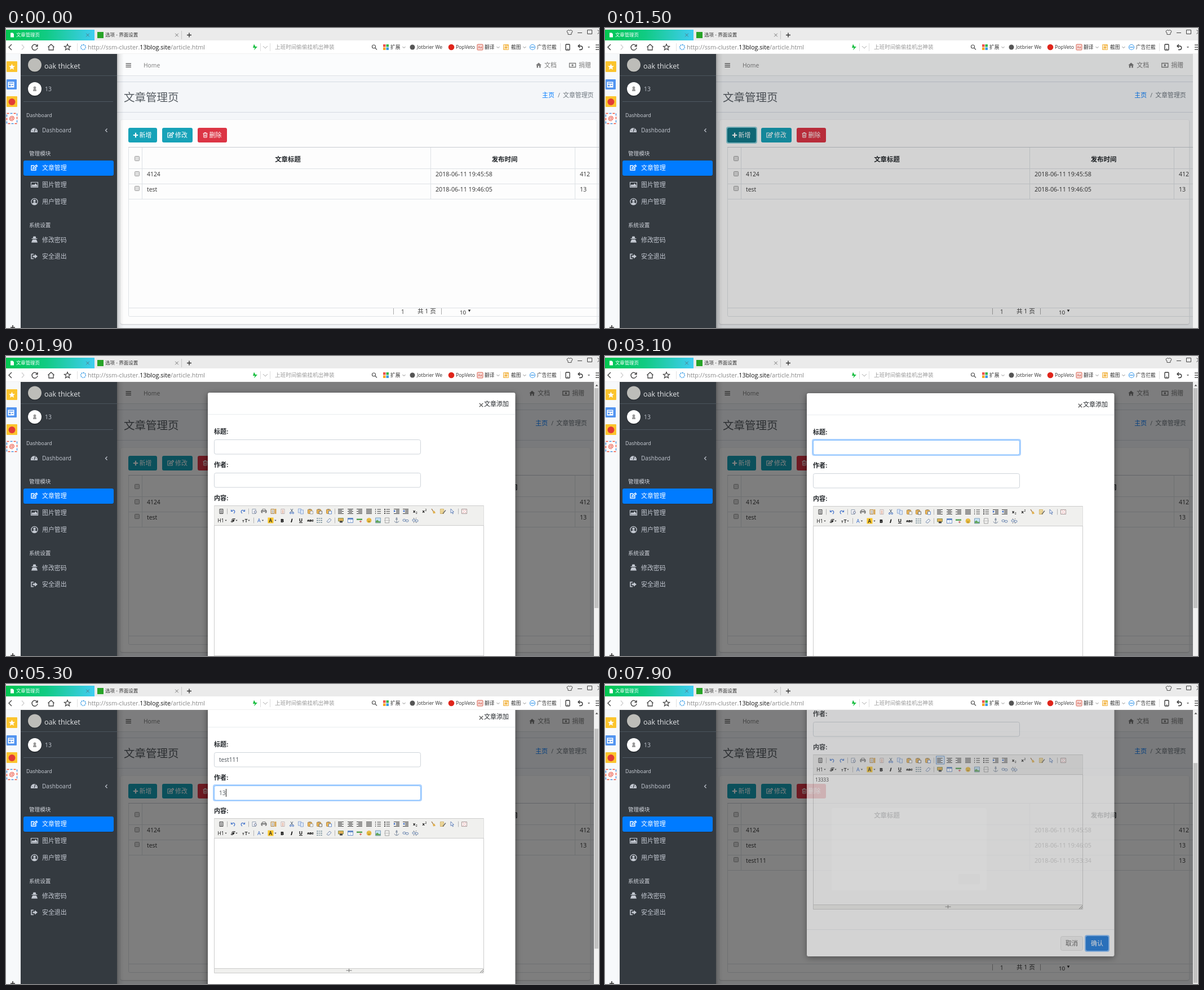
Write an HTML page with a canvas that moves like this. It is 1052 px wide and 532 px high and loops after 8 s.

```html
<!DOCTYPE html>
<html lang="zh">
<head>
<meta charset="utf-8">
<style>
html, body { margin: 0; width: 100%; height: 100%; overflow: hidden; background: #fff; }
canvas { display: block; }
</style>
</head>
<body>
<canvas id="stage" width="1052" height="532"></canvas>
<script>
const W = 1052, H = 532, LOOP = 8000, STEP = 100;
const FONT = '"Open Sans", "Noto Sans CJK SC", "Noto Sans CJK", sans-serif';
const stage = document.getElementById('stage').getContext('2d');
const layer = Object.assign(document.createElement('canvas'), { width: W, height: H }).getContext('2d');
let g = stage;

const clamp = v => Math.max(0, Math.min(1, v));

// cubic-bezier(0, 0, .58, 1)
function easeOut(x) {
  x = clamp(x);
  let lo = 0, hi = 1;
  for (let i = 0; i < 20; i++) {
    const s = (lo + hi) / 2;
    if (1.74 * (1 - s) * s * s + s ** 3 < x) lo = s; else hi = s;
  }
  return 3 * (1 - lo) * lo * lo + lo ** 3;
}

// ---- drawing helpers ----
function rect(x, y, w, h, fill) { g.fillStyle = fill; g.fillRect(x, y, w, h); }

function box(x, y, w, h, r, fill, stroke, lw = 1) {
  g.beginPath();
  g.roundRect(x, y, w, h, r);
  if (fill) { g.fillStyle = fill; g.fill(); }
  if (stroke) { g.strokeStyle = stroke; g.lineWidth = lw; g.stroke(); }
}

function disc(x, y, r, fill, stroke, lw = 1) { box(x - r, y - r, 2 * r, 2 * r, r, fill, stroke, lw); }

function setFont(size, weight = 400) { g.font = `${weight} ${size}px ${FONT}`; }

// y is the middle of the line; returns the text width
function text(s, x, y, size, color, weight, align = 'left') {
  setFont(size, weight);
  g.textAlign = align;
  g.fillStyle = color;
  g.fillText(s, x, y + size * 0.36);
  return g.measureText(s).width;
}

// path drawn around (x, y)
function icon(x, y, d, color, lw = 1.2, fill) {
  const p = new Path2D(d);
  g.save();
  g.translate(x, y);
  if (fill) { g.fillStyle = fill; g.fill(p); }
  if (lw) { g.strokeStyle = color; g.lineWidth = lw; g.stroke(p); }
  g.restore();
}
const solid = (x, y, d, color) => icon(x, y, d, color, 0, color);
const chevron = (x, y, color = '#888') => icon(x, y, 'M-2.5-1L0 1.5L2.5-1', color, 1);
const cross = (x, y, r, color, lw = 1) => icon(x, y, `M${-r} ${-r}L${r} ${r}M${r} ${-r}L${-r} ${r}`, color, lw);
const plus = (x, y, r, color, lw) => icon(x, y, `M${-r} 0H${r}M0 ${-r}V${r}`, color, lw);
const HOUSE = 'M-5 0L0-4.5L5 0H3.5V4.5H1V1H-1V4.5H-3.5V0Z';
const STAR = 'M0-5.5L1.6-1.8L5.5-1.6L2.5 1L3.5 5L0 2.8L-3.5 5L-2.5 1L-5.5-1.6L-1.6-1.8Z';
const PENCIL = 'M3 0V4H-5V-4H0M-2 1.5L-1.5-.8L4-5L5.5-3.2L0 1.2Z';

// ---- browser frame ----
function drawChrome() {
  rect(0, 0, W, 22, '#ebebeb');
  const tab = g.createLinearGradient(0, 0, 157, 0);
  tab.addColorStop(0, '#02c751');
  tab.addColorStop(0.45, '#10cb83');
  tab.addColorStop(1, '#40cdf2');
  rect(0, 3, 157, 19, tab);
  solid(11, 12.5, 'M-3-4H1L3-2V4H-3Z', '#fff');
  text('文章管理页', 18, 12, 8.4, '#fff');
  cross(145, 12.5, 2.8, '#507a88');
  rect(162, 7, 11, 11, '#28a428');
  text('选项 - 界面设置', 176, 12, 8.5, '#333');
  cross(303, 12.5, 2.8, '#777');
  rect(311, 5, 1, 15, '#c8c8c8');
  plus(325, 12.5, 4, '#333', 1.4);
  icon(1000, 7.5, 'M-2-4L-5-2L-4 1H-3V4H3V1H4L5-2L2-4Q0-2-2-4Z', '#555', 1);
  rect(1014, 8, 8, 1, '#444');
  box(1031.5, 3.5, 8, 7, 0, null, '#444');
  cross(1053, 7, 3.5, '#444');

  rect(0, 22, W, 24, '#fff');
  rect(0, 45, W, 1, '#f0f0f0');
  icon(7, 34, 'M3-5L-2 0L3 5', '#444', 1.4);
  icon(30, 34, 'M-2-4.5L2 0L-2 4.5', '#ccc', 1.2);
  icon(51, 34, 'M4.5-2A5 5 0 1 0 5 1M5-5V-1.5H1.5', '#444', 1.4);
  icon(80, 34, 'M-5.5 0L0-5L5.5 0M-4-1V5H4V-1', '#444', 1.3);
  icon(109, 34, STAR, '#444', 1.2);
  rect(126, 27, 1, 14, '#e0e0e0');
  g.setLineDash([2, 1.2]);
  disc(137, 34, 4.3, null, '#4aa5e8', 1.8);
  g.setLineDash([]);
  let x = 145;
  for (const [s, c] of [['http://ssm-cluster.', '#888'], ['13blog.site', '#111'], ['/article.html', '#888']])
    x += text(s, x, 34, 10.8, c);
  solid(442, 34, 'M-2-5.5L-4 1H-.5L-2 5.5L4-1H.5Z', '#1ec045');
  rect(451, 27, 1, 14, '#ddd');
  icon(460, 34, 'M-4-2L0 2L4-2', '#aaa', 1);
  rect(468, 27, 1, 14, '#ddd');
  text('上班时间偷偷挂机出神装', 477, 34, 9.6, '#999');
  disc(652.5, 33, 3, null, '#555', 1.2);
  icon(656, 36.5, 'M-1-1L2 2', '#555', 1.3);

  ['#f0524c', '#39b54a', '#f6a623', '#3a9be8'].forEach((c, i) =>
    rect(669 + i % 2 * 5.5, 29 + (i >> 1) * 5.5, 4.5, 4.5, c));
  const label = (s, lx) => text(s, lx, 34, 8.7, '#333');
  label('扩展', 682); chevron(706, 34);
  disc(721, 34, 4.5, '#555'); label('Jotbrier We', 729);
  disc(790, 34, 5.3, '#e0251b'); label('PopVeto', 798);
  box(836, 29, 10, 10, 1, '#f8dcd8', '#d8604f');
  text('Aa', 841, 34, 6, '#c43b2e', 400, 'center');
  label('翻译', 849); chevron(873, 34);
  box(882, 29, 10, 10, 1, '#f3b94e');
  icon(887, 34, 'M-3-4V3H4M-4-2H3V4', '#fff', 1.1);
  label('截图', 896); chevron(920, 34);
  disc(934, 34, 4.5, '#fff', '#3e9cec', 1.2);
  rect(931, 33.3, 6, 1.4, '#3e9cec');
  label('广告拦截', 942);
  rect(983, 27, 1, 14, '#ddd');
  box(993, 29, 7, 10, 1, null, '#333', 1.3);
  rect(995.5, 36.5, 2, 1, '#333');
  icon(1019, 34, 'M-1-5L-4-2L-1 1M-4-2H1A3.3 3.3 0 0 1 1 4.5H-2', '#333', 1.3);
  solid(1034, 34, 'M-2-1H2L0 1.5Z', '#666');
  for (const y of [30, 34, 38]) rect(1046, y - .5, 6, 1.2, '#333');

  // shortcut strip
  rect(0, 46, 26, H - 46, '#f7f9fb');
  box(1, 59, 19, 19, 1, '#fbc42d');
  solid(10.5, 69, STAR, '#fff');
  box(1, 91, 18, 18, 1, '#5294f0');
  box(3.5, 95.5, 11, 10, 0, '#fff');
  rect(5, 97, 8, 1.5, '#5294f0');
  rect(5, 100.5, 3.5, 3, '#5294f0');
  rect(10, 101, 3, 1.5, '#5294f0');
  box(1, 121, 19, 19, 1, '#fbc42d');
  disc(10.5, 131, 6, '#e23b36');
  g.setLineDash([4, 8]);
  box(1.5, 151.5, 18, 18, 0, '#fff', '#ef4c36', 1.4);
  g.lineDashOffset = 6;
  box(1.5, 151.5, 18, 18, 0, null, '#4a90d9', 1.4);
  g.setLineDash([]);
  g.lineDashOffset = 0;
  text('@', 10.5, 160.5, 11, '#e8402c', 600, 'center');
  plus(12, 531, 4, '#333', 1.6);
}

// ---- page ----
function drawSidebar() {
  const shade = g.createLinearGradient(197, 0, 209, 0);
  shade.addColorStop(0, 'rgba(0,0,0,.23)');
  shade.addColorStop(0.35, 'rgba(0,0,0,.08)');
  shade.addColorStop(1, 'rgba(0,0,0,0)');
  rect(197, 46, 12, H - 46, shade);
  rect(26, 46, 171, H - 46, '#343a40');
  rect(26, 84, 171, 1, '#4b545c');
  const soft = '#c2c7d0';
  disc(51, 66.5, 12.5, '#272c31');
  disc(51, 65.5, 12, '#bdbdb9');
  text('oak thicket', 68, 67, 12.6, '#e2e4e6');
  disc(51, 109.5, 12.5, '#272c31');
  disc(51, 108, 12, '#fff');
  solid(51, 108, 'M-3 4Q-3 0-1 0A2.4 2.4 0 1 1 1 0Q3 0 3 4Z', '#999');
  text('13', 69, 108, 10.4, soft);
  rect(31, 130, 159, 1, '#4f5962');
  text('Dashboard', 36, 155, 8.9, '#d0d4db');
  solid(50, 181, 'M-6 4A6.2 6.2 0 1 1 6 4Z', soft);
  icon(50, 181, 'M0 3L2-3M-4 1H-3M3 1H4', '#343a40', 1.2);
  text('Dashboard', 64, 181, 10.1, soft);
  icon(178, 181.5, 'M1.5-3L-1.5 0L1.5 3', soft, 1.2);
  text('管理模块', 41, 222.5, 9.6, '#d0d4db');
  box(31, 236, 160, 27, 3, '#2b3035');
  box(31, 235, 160, 27, 3, '#007bff');
  icon(50, 248, PENCIL, '#fff', 1.4);
  text('文章管理', 64, 248.5, 10.9, '#fff');
  box(44.5, 273.5, 12, 9, 0, null, soft, 1.2);
  solid(50.5, 278, 'M-5 3.5V1L-2.5-1L-1 .5L2-2.5L5 1V3.5Z', soft);
  text('图片管理', 64, 278.5, 10.9, soft);
  disc(50.5, 308, 5.6, null, soft, 1.3);
  disc(50.5, 306.5, 2.2, soft);
  solid(50.5, 308, 'M-4 4Q-3 1 0 1T4 4Q0 7-4 4Z', soft);
  text('用户管理', 64, 308, 10.9, soft);
  text('系统设置', 41, 349.5, 9.6, '#d0d4db');
  solid(50.5, 375, 'M-2-5.5H2L3-2H5V-1H-5V-2H-3ZM-3 0H3Q5 2 5.5 5.5H-5.5Q-5 2-3 0Z', soft);
  text('修改密码', 64, 376, 10.9, soft);
  icon(50, 405, 'M-1-4H-5V4H-1', soft, 1.6);
  solid(50, 405, 'M-2.5-1.5H1V-4L6 0L1 4V1.5H-2.5Z', soft);
  text('安全退出', 64, 405, 10.9, soft);
}

function button(x, w, label, tx, color) {
  box(x, 177, w, 26, 3, color);
  text(label, tx, 190, 10.9, '#fff');
}

function drawPage(t) {
  const open = t >= 1400, dx = open ? -11.7 : 0, right = open ? 1043 : W;
  const line = '#dee2e6', grey = '#7c7c7c';
  g.save();
  g.beginPath();
  g.rect(197, 46, right - 197, H - 46);
  g.clip();
  rect(197, 46, W, H, '#f4f6f9');
  rect(197, 46, W, 38, '#fbfcfd');
  rect(197, 84, W, 1, line);
  for (const y of [62.5, 65.5, 68.5]) rect(212.5, y, 9.5, 1.3, '#555');
  text('Home', 244, 66, 10.3, grey);
  solid(945 + dx, 66, HOUSE, grey);
  text('文档', 955 + dx, 66, 10.9, grey);
  box(999.5 + dx, 62.5, 11, 7, 0, null, grey, 1.3);
  disc(1005 + dx, 66, 1.8, grey);
  text('捐赠', 1016 + dx, 66, 10.9, grey);
  rect(197, 95, W, 1, '#d5dae2');
  rect(197, 149, W, 1, '#d5dae2');
  text('文章管理页', 209, 122.5, 19.5, '#565c62', 300);
  text('主页', 951 + dx, 119.5, 10.9, '#007bff');
  text('/', 979 + dx, 119.5, 10.5, '#6c757d');
  text('文章管理页', 988 + dx, 119.5, 10.9, '#6c757d');

  g.shadowColor = 'rgba(0,0,0,.22)';
  g.shadowBlur = 2;
  g.shadowOffsetY = .8;
  box(203, 163, 845 + dx, 362, 3, '#fdfdfd');
  g.shadowColor = 'transparent';

  const focused = t >= 1400 && t < 1900;
  if (focused) box(215, 175, 55, 30, 4, '#8ccfda');
  button(217, 51, '新增', 236.5, focused ? '#117a8b' : t >= 1000 && t < 1400 ? '#138496' : '#17a2b8');
  plus(230, 190, 4.2, '#fff', 2.2);
  button(277, 54, '修改', 300, '#17a2b8');
  icon(292, 190, PENCIL, '#fff', 1.2);
  button(340, 52, '删除', 360.5, '#dc3545');
  icon(353.5, 190, 'M-4-3H4M-1.5-3V-4.5H1.5V-3M-3-3L-2.7 4H2.7L3-3M-1-1V2.5M1-1V2.5', '#fff', 1);

  const rows = [['4124', '2018-06-11 19:45:58', '412'], ['test', '2018-06-11 19:46:05', '13']];
  if (t >= 7800) rows.push(['test111', '2018-06-11 19:53:34', '13']);
  const bottom = 250 + rows.length * 26.7;
  box(217.5, 211.5, 900, 300, 2, null, line);
  rect(217, 211, 900, 1, '#c8ccd1');
  rect(217, 249, 900, 1, line);
  rect(217, 496, 900, 1, line);
  for (const x of [241, 753, 1009]) rect(x, 212, 1, bottom - 212, line);
  const check = y => box(228.5, y - 4, 8, 8, 1, '#dedede', '#a0a0a0');
  check(231.5);
  text('文章标题', 500, 232.5, 11.4, '#212529', 700, 'center');
  text('发布时间', 884.5, 232.5, 11.4, '#212529', 700, 'center');
  rows.forEach(([title, date, author], i) => {
    const y = 259.5 + i * 26.8;
    rect(217, Math.round(y + 16.5), 900, 1, line);
    check(Math.round(y) - 1.5);
    text(title, 250, y, 10.4, '#333');
    text(date, 762, y, 10.7, '#333');
    text(author, 1018, y, 10.6, '#333');
  });
  rect(687, 497, 1, 11, '#aaa');
  text('1', 701, 503, 10, '#333');
  text('共 1 页', 730, 502, 10.6, '#333');
  rect(772, 497, 1, 11, '#aaa');
  text('10', 805, 504, 9.8, '#222');
  solid(822, 501.5, 'M-2.3-2H2.3L0 2Z', '#222');
  g.restore();
}

function drawScrollbar(t, scroll) {
  rect(1043, 46, 9, H - 46, '#f1f1f1');
  if (t < 1600) return;
  solid(1048, 52, 'M-2.5 1.5L0-1.5L2.5 1.5Z', '#505050');
  rect(1044, 57 + scroll * .8, 7, 390, '#c1c1c1');
}

// ---- editor toolbar ----
function bars(x, y, starts, ends, color = '#444') {
  starts.forEach((s, i) => rect(x - 5 + s, Math.round(y - 4.5 + i * 2), ends[i] - s, 1, color));
}

function page(x, y, edge, fill, mark, w = 6, h = 8) {
  box(x - w / 2, y - h / 2, w, h, 0, fill, edge, .9);
  for (let i = 0; i < 3; i++) rect(x - w / 2 + 1.5, y - 2 + i * 2, w - 3, .8, mark);
}

function clipboard(x, y, mark) {
  box(x - 4.5, y - 3.5, 7, 7.5, 1, '#eab65a', '#a5782f', .8);
  rect(x - 2.5, y - 4.5, 3, 1.5, '#888');
  box(x - .5, y - .5, 5, 5, 0, '#fff', mark, .8);
}

function drawToolbar(y, active) {
  const sep = (x, sy) => rect(x, sy - 5, 1, 10, '#b5b5b5');
  const arrow = (x, sy) => solid(x, sy, 'M-1.7-.8H1.7L0 1.2Z', '#333');
  rect(369.5, y, 478, 34.5, '#f0f0ee');
  rect(369.5, y + 34, 478, 1, '#ccc');
  const a = y + 9.5, b = y + 25.5;
  [392, 430, 583, 802].forEach(x => sep(x, a));
  [439, 583].forEach(x => sep(x, b));

  page(382, a, '#333', '#ddd', '#444');
  const UNDO = 'M-3.5-3V0H-.5M-3-.5Q0-3.5 2.5-1Q3.5 2 1 3.5';
  icon(403, a, UNDO, '#4a78cc', 1.2);
  g.save(); g.translate(420, a); g.scale(-1, 1); icon(0, 0, UNDO, '#4a78cc', 1.2); g.restore();
  page(440, a, '#8492a6', '#fff', '#ccd'); disc(442.5, a + 1, 2, '#dce9fa', '#778', .9);
  box(453, a - 2, 9, 4.5, 1, '#999', '#555', .9); box(455, a - 4, 5, 2.5, 0, '#fff', '#666', .8); rect(455, a + 1, 5, 3, '#eee');
  page(473, a, '#a98046', '#fbe9c8', '#6f91cc'); rect(477, a - 4.5, 2.5, 9, '#d9a650');
  page(491, a, '#b9a9a9', '#fff', '#c96f4a');
  icon(507, a, 'M-2-4.5L2 2M2-4.5L-2 2', '#567', 1);
  disc(504.8, a + 2.8, 1.4, null, '#3a6bc4', 1); disc(509.2, a + 2.8, 1.4, null, '#3a6bc4', 1);
  page(521, a - 1, '#7f9fd0', '#eef4fc', '#b3c8e8', 5, 7); page(525, a + 1, '#7f9fd0', '#eef4fc', '#b3c8e8', 5, 7);
  clipboard(540, a, '#888'); clipboard(556, a, '#444'); clipboard(573, a, '#3d70c2');

  if (active) box(587.5, y + 2, 14.5, 14, 0, '#e2ecf8', '#5b8fc9');
  const short = [10, 7, 10, 7, 10];
  bars(594, a, [0, 0, 0, 0, 0], short);
  bars(611, a, [0, 2, 0, 2, 0], [10, 8, 10, 8, 10]);
  bars(627, a, [0, 3, 0, 3, 0], [10, 10, 10, 10, 10]);
  bars(644, a, [0, 0, 0, 0, 0], [10, 10, 10, 10, 10]);
  for (const [x, w] of [[660, 1], [676, 2]])
    for (const d of [-4, -.5, 3]) { rect(x - 5, a + d - .5, w, 2, '#444'); rect(x - 1.5, a + d, 6.5, 1, '#444'); }
  for (const [x, d] of [[693, 1], [709, -1]]) {
    bars(x, a, [0, 4, 4, 4, 0], [10, 10, 10, 10, 10]);
    solid(x - 3.5, a - .5, `M${-1.5 * d}-2L${1.5 * d} 0L${-1.5 * d} 2Z`, '#2a5fc4');
  }
  text('x', 722, a - .5, 7.5, '#111', 700); text('2', 727, a + 2.5, 4.5, '#111', 600);
  text('x', 738.5, a, 7.5, '#111', 700); text('2', 743.5, a - 2.5, 4.5, '#111', 600);
  icon(758, a, 'M-3-4.5L0 0', '#9a7040', 1.3); solid(758, a, 'M-1 0L2-1L4 3L0 4Z', '#e0b050');
  page(773.5, a, '#c9a655', '#f8e8b4', '#c9a655'); icon(776, a, 'M4-2L-1 4', '#666', 1.3);
  icon(791, a, 'M-2-4.5V3L0 1.5L1.5 4.5L2.5 4L1.3 1H3.5Z', '#5d7cb4', .9, '#eef3fb');
  box(808.5, a - 4, 9, 8, 0, '#fff', '#a08888', .9);
  icon(813, a, 'M-2.5-2.5L-1-1M2.5-2.5L1-1M-2.5 2.5L-1 1M2.5 2.5L1 1', '#c44', 1);

  text('H1', 375.5, b, 8.6, '#111'); arrow(390, b);
  text('ℱ', 399, b, 9, '#111', 700); arrow(409, b);
  text('т', 419, b + .5, 7.5, '#111', 600); text('T', 423.5, b, 9, '#111', 600); arrow(431, b);
  text('A', 446, b, 9, '#2a62c8'); arrow(455.5, b);
  rect(464.5, b - 5, 10, 10, '#f9c62c'); text('A', 466.5, b, 8.5, '#222', 600); arrow(478, b);
  text('B', 490, b, 9, '#111', 800, 'center');
  g.save(); g.translate(507, b); g.transform(1, 0, -.25, 1, 0, 0); text('I', 0, 0, 9, '#111', 800, 'center'); g.restore();
  text('U', 523, b - .5, 8.4, '#111', 700, 'center'); rect(520, b + 3.5, 6, 1, '#111');
  text('ABC', 540, b, 5.6, '#111', 700, 'center'); rect(534, b, 12, .8, '#111');
  for (const d of [-3.5, 0, 3.5]) icon(556, b + d, 'M-5 0H-2M-1 0H1M2 0H5', '#467', 1);
  icon(573, b, 'M-4 2L1-3.5L4-1L0 3.5H-2Z', '#6b7fa0', .9, '#eef2fa');
  box(589.5, b - 4, 9, 5.5, 0, '#e2ae56', '#7a9650', .9); rect(592, b + 1, 5, 3, '#444');
  box(606.5, b - 4, 9, 8, 0, '#fff', '#6088c6', .9); rect(606.5, b - 4, 9, 2.5, '#6088c6'); rect(610.5, b - 2, 1, 6, '#b7cbe9');
  rect(622, b - 3, 10, 2.5, '#55a352'); icon(629, b, 'M0 0V4M-2 2H2', '#c55', 1);
  disc(644, b, 4, '#f7cb45', '#d5a436', .8);
  icon(644, b, 'M-2 1Q0 3.5 2 1M-1.5-1.5V-.5M1.5-1.5V-.5', '#6b4a10', .9);
  box(655.5, b - 4.5, 9, 9, 0, '#c6e3f6', '#7597b3', .9); solid(660, b, 'M-4 4V1L-1-1L2 2L4 1V4Z', '#63a65b');
  icon(676, b, 'M-3.5-1V-4.5H3.5V-1M-3.5 1V4.5H3.5V1M-5 0H-2M-1 0H1M2 0H5', '#999', .9);
  icon(693, b, 'M0-4V4M-2-2H2M-4 1Q-3 4 0 4Q3 4 4 1', '#7a889c', 1); disc(693, b - 4, .9, null, '#7a889c');
  for (const x of [709, 726]) {
    box(x - 5, b - 2, 5, 3.5, 1.7, null, '#5f7dab', 1);
    box(x, b - 1, 5, 3.5, 1.7, null, '#5f7dab', 1);
  }
  icon(726, b, 'M-3-4.5L-2-3M2-4.5L1-3M-3 4.5L-2 3M2 4.5L1 3', '#666', 1);
}

// ---- dialog ----
function typed(word, times, t) {
  return word.slice(0, times.filter(k => t >= k).length);
}

function field(y, value, ring, caret) {
  if (ring) box(367, y - 2, 371, 30, 4, `rgba(90,165,255,${.5 * ring})`);
  box(369.5, y + .5, 366, 25.5, 3, '#fff', ring > .6 ? '#80bdff' : '#ced4da');
  text(value, 378, y + 13.5, 10.2, '#495057');
  if (caret) { setFont(10.2); rect(Math.round(378 + g.measureText(value).width), y + 6, 1, 14, '#222'); }
}

function drawDialog(t, top) {
  g.save();
  g.beginPath();
  g.rect(197, 46, 846, H - 46);
  g.clip();
  g.translate(0, top);
  g.shadowColor = 'rgba(0,0,0,.5)';
  g.shadowBlur = 11;
  g.shadowOffsetY = 3;
  box(358, 66, 545.5, 558, 3, '#fff');
  g.shadowColor = 'transparent';
  rect(358, 104, 545, 1, '#e9ecef');
  cross(843, 88, 3.2, '#666', 1.5);
  text('文章添加', 848, 86, 11, '#212529');
  [['标题:', 135], ['作者:', 194], ['内容:', 253]].forEach(([s, y]) => text(s, 369, y, 11.1, '#212529', 700));

  const cleared = t >= 7800;
  const title = cleared ? '' : typed('test111', [3300, 3400, 3500, 3700, 4000, 4200, 4400], t);
  const author = cleared ? '' : typed('13', [4900, 5000], t);
  const ringAt = (from, to) => t < from || t >= to ? 0 : t < from + 100 ? .5 : 1;
  field(149, title, ringAt(2600, 4700), t >= 2600 && t < 4700 && (t < 3100 || t >= 3300));
  field(208, author, ringAt(4700, 5700), t >= 4700 && t < 5700);

  box(369.5, 266.5, 478, 274, 0, '#fff', '#ccc');
  drawToolbar(267, t >= 5700);
  const body = typed('13333', [6100, 6300, 6500, 6700, 6900], t);
  text(body, 373, 310.5, 8.4, '#222');
  setFont(8.4);
  if (t >= 5700 && t < 7400) rect(Math.round(373 + g.measureText(body).width), 305, 1, 10, '#111');
  rect(370, 532, 477, 8, '#f0f0ee');
  rect(370, 532, 477, 1, '#ccc');
  icon(608.5, 536, 'M-5 0H5M0-3V3', '#777', 1);
  icon(844, 537, 'M-3 3L3-3M0 3L3 0', '#777', 1);

  rect(358, 576, 545, 1, '#e9ecef');
  box(808.5, 588.5, 39, 25, 3, '#f4f4f4', '#ddd');
  text('取消', 817, 601, 10.9, '#444');
  if (t >= 7700) box(851, 586, 44, 30, 4, '#80bdff');
  box(853, 588, 40, 26, 3, t >= 7600 ? '#0069d9' : '#007bff');
  text('确认', 862, 601, 10.9, '#fff');
  g.restore();
}

function drawNotice() {
  box(402, 220, 275, 146, 3, 'rgba(255,255,255,.07)');
  rect(402, 330, 275, 1, 'rgba(255,255,255,.06)');
  box(627, 337, 38, 18, 2, 'rgba(0,0,0,.015)');
}

function draw(t) {
  const scroll = t < 5300 ? 0 : Math.round(104 * (.5 - .5 * Math.cos(Math.PI * clamp((t - 5148) / 440))));
  const fadeIn = t - 1615, fadeOut = t - 7849;
  const alpha = clamp(fadeIn / 150) - clamp(fadeOut / 150);
  const slide = -139.5 * (1 - easeOut(fadeIn / 300) + easeOut(fadeOut / 300));

  g = stage;
  rect(0, 0, W, H, '#fff');
  drawPage(t);
  const dim = .5 * clamp((t - 1450) / 150);
  rect(197, 46, 846, H - 46, `rgba(0,0,0,${dim})`);
  if (alpha > 0) {
    g = layer;
    g.clearRect(0, 0, W, H);
    drawDialog(t, Math.round(slide - scroll));
    g = stage;
    g.globalAlpha = alpha;
    g.drawImage(layer.canvas, 0, 0);
    g.globalAlpha = 1;
  }
  if (t >= 7900) drawNotice();
  if (t >= 1400) drawScrollbar(t, scroll);
  drawSidebar();
  drawChrome();
}

const begin = performance.now();
function tick() {
  const t = (performance.now() - begin) % LOOP;
  draw(Math.floor(t / STEP) * STEP);
  requestAnimationFrame(tick);
}
tick();
</script>
</body>
</html>
```
